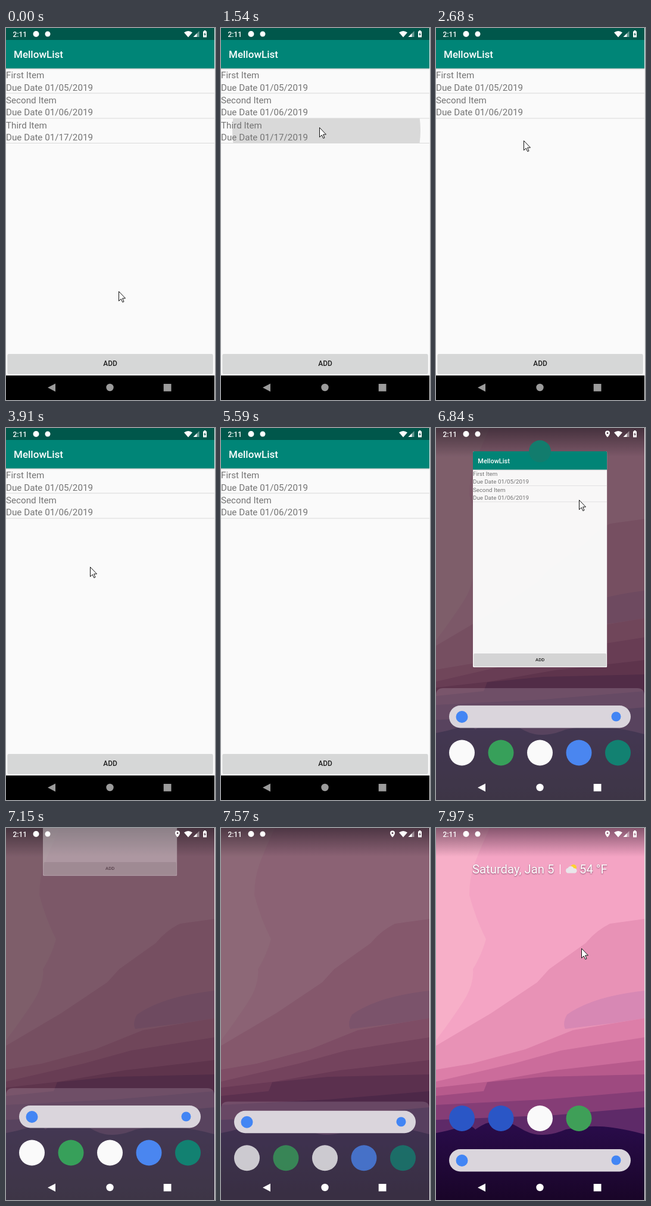
These frames come from a looping animation (351 by 622 pixels, 8000 ms). An HTML page:

```html
<!DOCTYPE html>
<html lang="en">
<head>
<meta charset="utf-8">
<title>To-do list demo</title>
<style>
html, body { margin: 0; width: 100%; height: 100%; overflow: hidden; background: #fafafa; }
svg { display: block; width: 351px; height: 622px; font-family: Roboto, "Noto Sans", sans-serif; }
.item { font-size: 15.2px; fill: #757575; }
.line { fill: #dadada; }
.bold { font-weight: 500; }
.date { font-size: 20.3px; fill: #fff; filter: drop-shadow(0 1px 1px rgba(60, 20, 50, .6)); }
</style>
</head>
<body>
<svg viewBox="0 0 351 622">
  <defs>
    <linearGradient id="hill" x2="0" y2="1">
      <stop stop-color="#2a0c4c"/><stop offset="1" stop-color="#190528"/>
    </linearGradient>
    <linearGradient id="top" x2="0" y2="1">
      <stop stop-color="#3c2034" stop-opacity=".6"/><stop offset="1" stop-color="#3c2034" stop-opacity="0"/>
    </linearGradient>
    <linearGradient id="shade" x2="0" y2="1">
      <stop stop-opacity=".25"/><stop offset="1" stop-opacity="0"/>
    </linearGradient>
    <clipPath id="row"><rect y="151" width="350" height="41"/></clipPath>
    <clipPath id="page"><rect y="20" width="350" height="561" rx="3"/></clipPath>

    <g id="app">
      <rect y="20" width="350" height="561" fill="#fafafa"/>
      <rect y="67" width="350" height="3" fill="url(#shade)"/>
      <rect y="20" width="350" height="47.5" fill="#008577"/>
      <text class="bold" x="13" y="50.3" font-size="17" fill="#fff">MellowList</text>
      <circle id="ripple" cx="177" cy="171" r="0" fill="#d9d9d9" clip-path="url(#row)"/>
      <g class="item">
        <text y="84">First Item</text>
        <text y="104.5">Due Date 01/05/2019</text>
        <text y="126">Second Item</text>
        <text y="146.3">Due Date 01/06/2019</text>
      </g>
      <rect class="line" y="108.5" width="350" height="1"/>
      <rect class="line" y="150.5" width="350" height="1"/>
      <g id="third">
        <g class="item">
          <text y="167.7">Third Item</text>
          <text y="188">Due Date 01/17/2019</text>
        </g>
        <rect class="line" y="192" width="350" height="1"/>
      </g>
      <rect x="2.5" y="546" width="345" height="32.5" rx="2" fill="#000" opacity=".16"/>
      <rect x="2.5" y="545" width="345" height="32.5" rx="2" fill="#d6d7d7"/>
      <text class="bold" x="175" y="565.2" font-size="12" text-anchor="middle" fill="#202020">ADD</text>
    </g>
  </defs>

  <g id="home">
    <rect width="350" height="622" fill="#f4a4c4"/>
    <path fill="#f7afc8" d="M0 0H90Q72 40 64 62T56 112Q66 150 84 186Q76 214 62 236Q64 262 46 290T0 355Z"/>
    <path fill="#e892b6" d="M350 152L292 160Q268 172 252 192L190 236L170 258L92 310L0 364V622H350Z"/>
    <path fill="#d788b4" d="M350 272Q300 278 270 288T220 312Q212 326 217 336L300 326L350 318Z"/>
    <path fill="#dc7ea8" d="M350 318L230 338L150 370L60 394L0 404V622H350Z"/>
    <path fill="#cb6c9b" d="M350 350L210 372L130 394L0 424V622H350Z"/>
    <path fill="#b75a8c" d="M350 388L200 405L90 424L0 434V622H350Z"/>
    <path fill="#9e4a80" d="M350 412L180 416L86 425L80 440L0 448V622H350Z"/>
    <path fill="#853d76" d="M350 440L180 454L0 463V622H350Z"/>
    <path fill="#5e2a68" d="M350 467L200 480L0 488V622H350Z"/>
    <path fill="url(#hill)" d="M0 510Q22 506 40 500T66 504Q86 490 104 490T140 501Q160 514 180 513T218 504Q246 498 275 499T350 512V622H0Z"/>
    <rect width="350" height="48" fill="url(#top)"/>
    <rect id="scrim" width="350" height="622" fill="#060e0e" opacity=".5"/>

    <g id="date">
      <text class="date" x="61" y="76.3">Saturday, Jan 5</text>
      <rect x="208" y="61" width="1" height="16" fill="#fff"/>
      <circle cx="231" cy="66" r="5" fill="#fdd22f"/>
      <path fill="#e9e6ea" d="M222 75.500A4.300 4.300 0 0 1 221.500 67A5.500 5.500 0 0 1 231.500 67.500A4 4 0 0 1 233.500 75.500Z"/>
      <text class="date" x="241" y="76.3">54 °F</text>
    </g>

    <g id="card">
      <use href="#app" clip-path="url(#page)" transform="translate(62 47) scale(.644) translate(0 -20)"/>
      <circle cx="174.500" cy="47" r="18.500" fill="#117d6e"/>
    </g>

    <path id="panel" fill="#c8b8c8" opacity=".25" d="M0 622V447Q0 435 12 435H338Q350 435 350 447V622Z"/>
    <g id="recentApps"></g>
    <g id="homeApps"></g>
    <g id="search">
      <rect x="22" y="464" width="305" height="37.500" rx="18.750" fill="#dad5dc"/>
      <circle cx="43.500" cy="483" r="10" fill="#4285f4"/>
      <circle cx="302.500" cy="482.500" r="8" fill="#4285f4"/>
    </g>
  </g>

  <g id="full">
    <rect width="350" height="20" fill="#00574b"/>
    <use href="#app"/>
    <rect y="581" width="350" height="41" fill="#000"/>
  </g>

  <g fill="#fff">
    <text class="bold" x="11.500" y="14.500" font-size="12">2:11</text>
    <circle cx="50.500" cy="10" r="5"/>
    <circle cx="70" cy="10" r="4.500"/>
    <path id="pin" fill-rule="evenodd" d="M288 15.500Q284 11 284 8.500A4 4 0 0 1 292 8.500Q292 11 288 15.500ZM288 7A1.500 1.500 0 1 0 288 10A1.500 1.500 0 1 0 288 7Z"/>
    <path d="M299 7.500Q306 2.500 313 7.500L306 15.500Z"/>
    <path opacity=".4" d="M314.500 15H324.500V5Z"/>
    <path d="M314.500 15H320.500V9Z"/>
    <path fill-rule="evenodd" d="M331 5.500H332.700V4H335.300V5.500H337V15.500H331ZM334.500 7L332.300 11H333.600V14L335.800 10H334.500Z"/>
  </g>
  <g id="nav">
    <path d="M70 601.300L83 594.500V608Z"/>
    <circle cx="174.500" cy="601" r="6.200"/>
    <rect x="264.700" y="595" width="12.800" height="12.500"/>
  </g>
  <rect x="350" width="1" height="622" fill="#f0f0f0"/>
  <path id="cursor" fill="#fff" stroke="#111" d="M.5 .5V16.500L4.200 13L6.800 18.500L9 17.500L6.600 12H11.500Z"/>
</svg>
<script>
const LOOP = 8000;
const $ = id => document.getElementById(id);

// Each entry: start in ms, then values held until the next entry.
const pointer = [
  [0, 189, 440], [120, 183, 442], [400, 172, 320], [520, 167, 246], [640, 162, 186],
  [800, 162, 163], [1110, 164, 165], [1260, 165, 166], [2680, 147, 188], [2800, 137, 215],
  [3080, 137, 216], [3910, 141, 232], [4030, 146, 250], [4180, 148, 255], [4930, 150, 257],
  [5080, 184, 332], [5200, 248, 500], [5320, 275, 550], [5470, 276, 592], [5590, -50, 0],
  [6300, 241, 361], [6420, 241, 394], [6570, 241, 388], [6690, 241, 340], [6840, 240, 120],
  [6990, -50, 0], [7700, 236, 112], [7850, 234, 157], [7970, 244, 201]
];
const rippleSize = [[0, 0], [1540, 158], [1690, 400], [2000, 0]];
const cardLift = [[0, 0], [6570, 1], [6690, 3], [6840, 8], [6990, 201], [7150, 328], [7300, 480]];
const homeShift = [[0, 0], [7450, .12], [7575, .45], [7700, .8], [7850, .95], [7970, 1]];

function held(track, t) {
  let now = track[0];
  for (const step of track) if (step[0] <= t) now = step;
  return now.slice(1);
}

function addApps(id, y, colors) {
  $(id).innerHTML = colors.map((c, i) =>
    `<circle cx="${43.5 + i * 65.5}" cy="${y}" r="21.5" fill="${c}"/>`).join("");
}
addApps("recentApps", 543, ["#fafafa", "#37a05a", "#fafafa", "#4a86f0", "#128171"]);
addApps("homeApps", 485.5, ["#2a56c6", "#2a56c6", "#fafafa", "#3f9f58"]);

const show = (id, on) => { $(id).style.display = on ? "" : "none"; };
const set = (id, name, value) => $(id).setAttribute(name, value);
const move = (id, x, y) => set(id, "transform", `translate(${x} ${y})`);

function draw(t) {
  const inApp = t < 6300;
  const [x, y] = held(pointer, t);
  const [lift] = held(cardLift, t);
  const [p] = held(homeShift, t);
  const late = Math.max(0, 2 * p - 1);

  move("cursor", x, y);
  set("ripple", "r", held(rippleSize, t)[0]);
  show("third", t < 1850);
  show("full", inApp);
  show("home", !inApp);
  show("pin", !inApp);
  set("nav", "fill", inApp ? "#9b9b9b" : "#fff");

  move("card", 0, -lift);
  set("card", "opacity", Math.max(0, 1 - lift / 540));
  show("card", t < 7300);

  set("scrim", "opacity", .5 * (1 - p));
  set("panel", "opacity", .25 * (1 - p));
  move("panel", 0, 187 * p);
  move("search", 0, 73 * p);
  move("recentApps", 0, 73 * p);
  set("recentApps", "opacity", Math.max(0, 1 - 2 * p));
  set("homeApps", "opacity", late);
  set("date", "opacity", late);
}

const start = performance.now();
function tick() {
  draw((performance.now() - start) % LOOP);
  requestAnimationFrame(tick);
}
draw(0);
requestAnimationFrame(tick);
</script>
</body>
</html>
```
